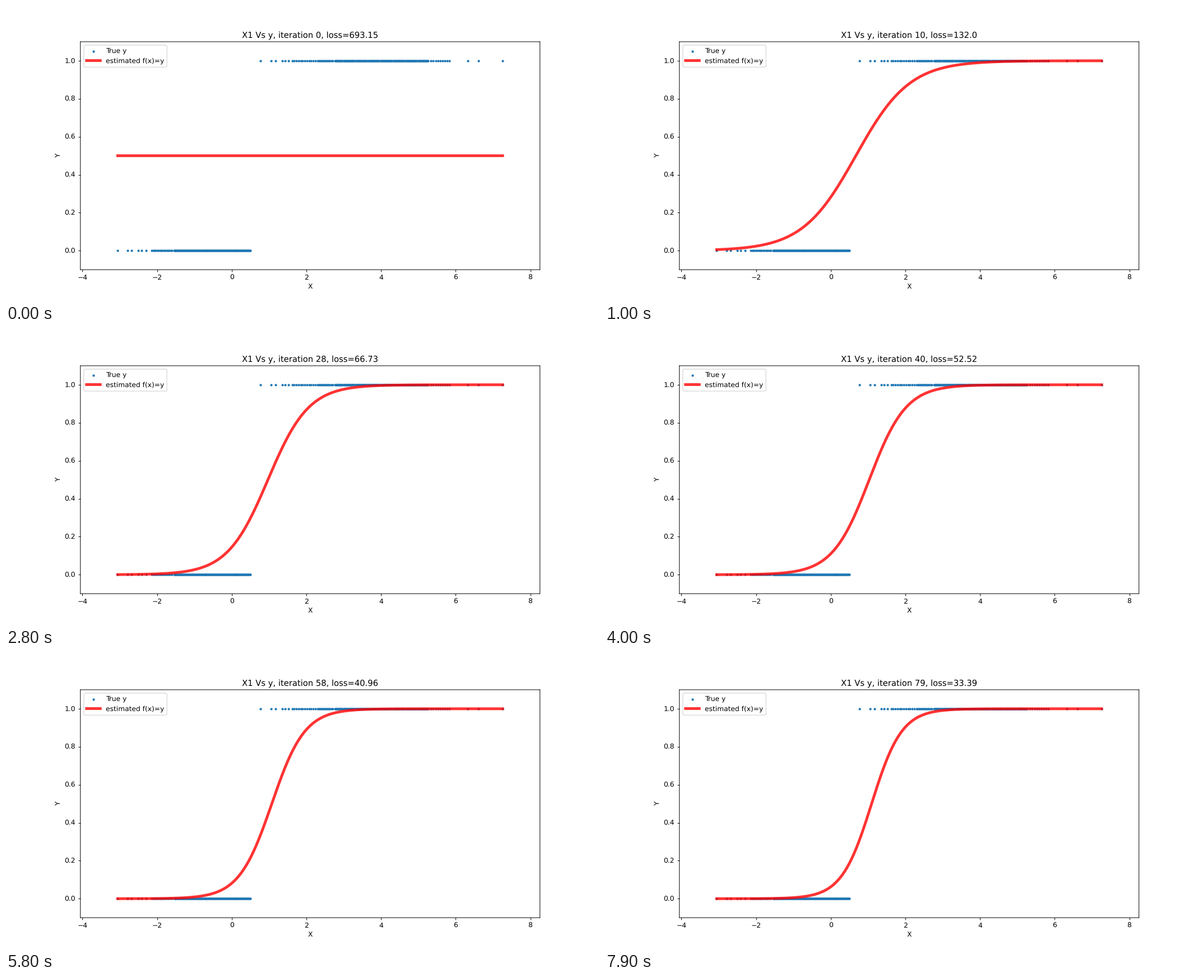
Animation of 1058x529 px, one loop 8 s. Source, as a matplotlib script:

```python
import numpy as np
import matplotlib.pyplot as plt
from matplotlib.animation import FuncAnimation

FRAMES, STEP_MS = 80, 100
X_MIN, X_MAX = -3.055, 7.257
# iteration: (slope, bias, loss)
KEYS = {10: (1.39, -0.935, 132.0),
        28: (1.83, -1.775, 66.73),
        79: (2.475, -2.71, 33.39)}

# Soft edges and unhinted glyphs, as in a slightly reduced plot.
plt.rcParams.update({"path.snap": False, "text.hinting": "none"})

grid = np.linspace(X_MIN, X_MAX, 600)


def sigmoid(z):
    return 1 / (1 + np.exp(-z))


def bell(mean, keep):
    d = np.exp(-(grid - mean) ** 2 / 2) * keep
    return d / d.sum() / 2


def descend(rate=1.0, count=1000):
    """Gradient descent of a logistic fit; rows are (w, b, loss)."""
    low, high = bell(0, grid < 0.5), bell(4, grid > 0.78)
    w = b = 0.0
    rows = []
    for _ in range(FRAMES):
        z = w * grid + b
        loss = low @ np.logaddexp(0, z) + high @ np.logaddexp(0, -z)
        rows.append((w, b, count * loss))
        err = low * sigmoid(z) - high * sigmoid(-z)
        w -= rate * (err @ grid)
        b -= rate * err.sum()
    return np.array(rows).T


def calibrate(path, values):
    """Scale a path smoothly so that it meets the key values."""
    at = list(KEYS)
    ratio = np.append(1, np.array(values) / path[at])
    return path * np.interp(np.log1p(np.arange(FRAMES)),
                            np.log1p([0] + at), ratio)


w, b, loss = map(calibrate, descend(), zip(*KEYS.values()))

# A few outliers, then looser and denser runs.
zeros = np.concatenate([
    [X_MIN, -2.79, -2.68, -2.5, -2.42, -2.3],
    np.linspace(-2.14, -1.6, 16), np.linspace(-1.55, 0.5, 140)])
ones = np.concatenate([
    [0.776, 1.05, 1.17, 1.35, 1.43, 1.52, 6.324, 6.617, X_MAX],
    np.linspace(1.62, 2.24, 12), np.linspace(2.3, 2.7, 14),
    np.linspace(2.765, 5.265, 160), np.linspace(5.34, 5.83, 9)])

fig, ax = plt.subplots(figsize=(12, 6), dpi=1058 / 12)
half_x, half_y = 0.5 / 1200, 0.5 / 600
fig.subplots_adjust(left=0.125 + half_x, right=0.9 + half_x,
                    bottom=0.11 - half_y, top=0.88 - half_y)
ax.scatter(np.append(zeros, ones), np.repeat([0, 1], [len(zeros), len(ones)]),
           s=6, label="True y")
line, = ax.plot(grid, grid * 0, color="red", lw=4, alpha=0.8,
                label="estimated f(x)=y")
ax.set(xlim=(X_MIN - 1, X_MAX + 1), ylim=(-0.1, 1.1), xlabel="X", ylabel="Y")
ax.legend(loc="upper left")
title = ax.set_title("")


def update(i):
    line.set_ydata(sigmoid(w[i] * grid + b[i]))
    title.set_text(f"X1 Vs y, iteration {i}, loss={round(float(loss[i]), 2)}")
    return line, title


anim = FuncAnimation(fig, update, frames=FRAMES, interval=STEP_MS,
                     repeat=True, repeat_delay=0)
plt.show()
```
